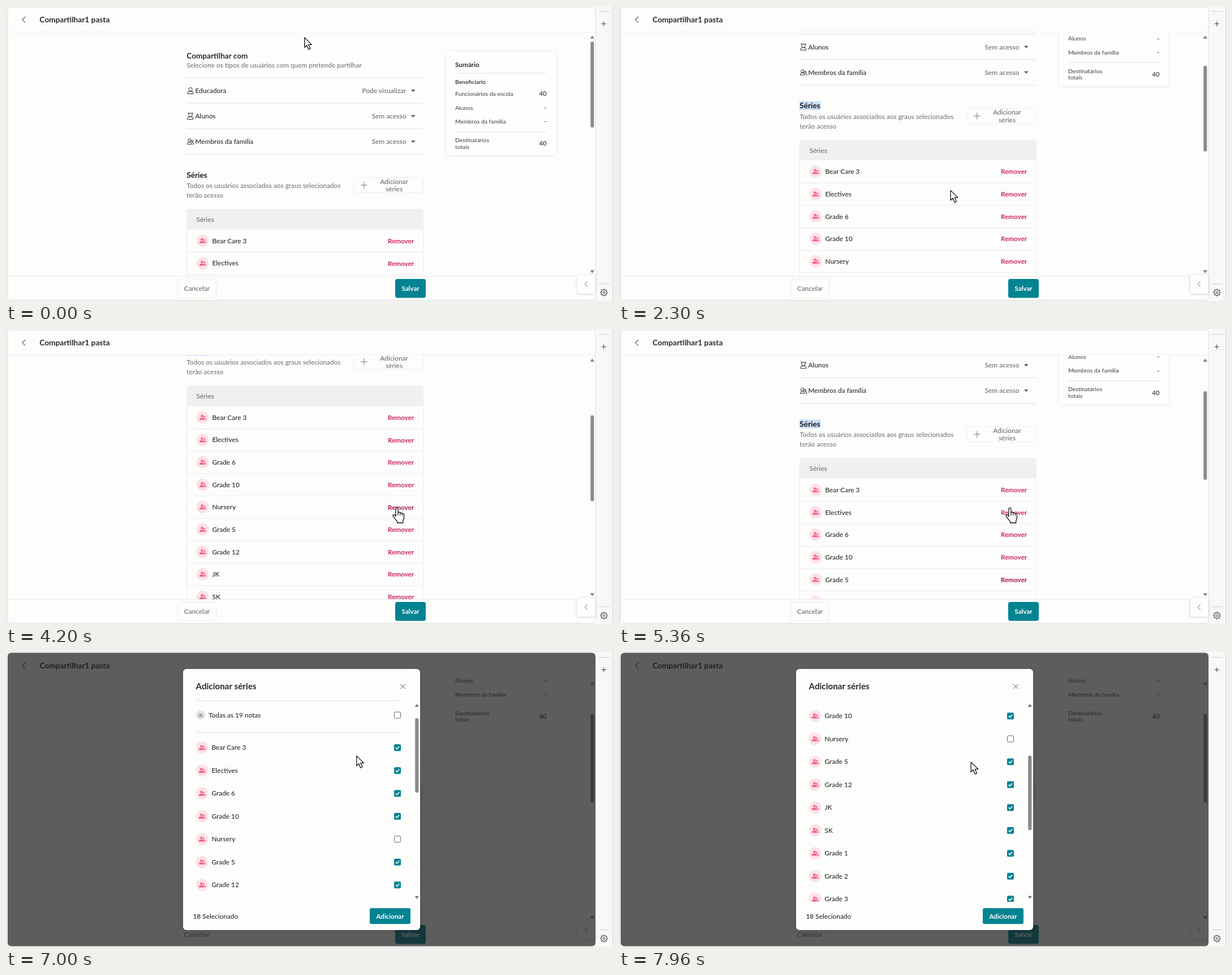
These frames come from a looping animation (1073 px wide and 522 px high, 8 s). An HTML page:

```html
<!DOCTYPE html>
<html lang="pt">
<head>
<meta charset="utf-8">
<title>Compartilhar pasta</title>
<style>
html, body { margin: 0; width: 100%; height: 100%; overflow: hidden; background: #f8f8f8; }
svg { display: block; width: 1073px; height: 522px; font-family: Lato, "Open Sans", sans-serif; }
text { white-space: pre; }
</style>
</head>
<body>
<svg id="stage" viewBox="0 0 1073 522" xmlns="http://www.w3.org/2000/svg"></svg>
<script>
const LOOP = 8000, ROW = 39.65, MROW = 40.5, TICK = 129.5, BODY = 11.85;
const INK = '#2b2b2b', GREY = '#6c6c6c', TEAL = '#038391', RED = '#cf2457', DARK_RED = '#a31540';
const NAMES = ['Bear Care 3', 'Electives', 'Grade 6', 'Grade 10', 'Nursery', 'Grade 5', 'Grade 12',
  'JK', 'SK', 'Grade 1', 'Grade 2', 'Grade 3', 'Grade 4', 'Grade 7', 'Grade 8'];
const REMOVED = 4;

// cy is the middle of the capital letters
const text = (x, cy, s, size = BODY, fill = INK, weight = 500, anchor = 'start', extra = '') =>
  `<text x="${x}" y="${cy + size * 0.355}" font-size="${size}" fill="${fill}" font-weight="${weight}" text-anchor="${anchor}" ${extra}>${s}</text>`;
const rect = (x, y, w, h, r, fill, stroke = 'none', extra = '') =>
  `<rect x="${x}" y="${y}" width="${w}" height="${h}" rx="${r}" fill="${fill}" stroke="${stroke}" ${extra}/>`;
const path = (d, stroke = INK, width = 1, fill = 'none', extra = '') =>
  `<path d="${d}" stroke="${stroke}" stroke-width="${width}" fill="${fill}" ${extra}/>`;
const hline = (x1, x2, y, color = '#e2e2e2') => path(`M${x1} ${y}H${x2}`, color);
const tri = (x, y, w, h, fill) => path(`M${x - w} ${y - h}H${x + w}L${x} ${y + h}Z`, 'none', 0, fill);
const group = (id, body, extra = '') => `<g id="${id}" ${extra}>${body}</g>`;

const people = (x, y, k, fill) => `<g transform="translate(${x} ${y}) scale(${k})" fill="${fill}">
  <circle cx="-1.2" cy="-2.6" r="2.3"/><path d="M-6 4.5v-1.2q0-2.8 4.8-2.8q4.8 0 4.8 2.8v1.2z"/>
  <circle cx="3.2" cy="-1.4" r="1.7"/><path d="M4.4 4.5v-1.4q0-1.4-.9-2.1q3.2 0 3.2 2.2v1.3z"/></g>`;
const badge = (x, y) => `<circle cx="${x}" cy="${y}" r="11" fill="#fde2e8"/>` + people(x, y, 0.95, '#f26385');

const person = (x, y) => path(`M${x - 5} ${y + 5.5}v-1.6q0-2.9 3-2.9h4q3 0 3 2.9v1.6z`) +
  `<circle cx="${x}" cy="${y - 2.3}" r="3.3" fill="none" stroke="${INK}"/>`;
const pupil = (x, y) => path(`M${x - 5} ${y + 5.5}v-1.6q0-2.6 2.8-2.6h4.4q2.8 0 2.8 2.6v1.6zM${x - 5} ${y - 5.3}h10M${x - 3} ${y - 5}v3.2a3 3 0 0 0 6 0v-3.2`);
const family = (x, y) => path(`M${x - 5.5} ${y + 4.5}v-1q0-2.8 3.8-2.8q3.8 0 3.8 2.8v1zM${x + 3.6} ${y + 4.5}h2.4v-1q0-2.3-3.2-2.5`) +
  `<circle cx="${x - 1.7}" cy="${y - 2.3}" r="2.6" fill="none" stroke="${INK}"/><circle cx="${x + 3.1}" cy="${y - 0.9}" r="1.6" fill="none" stroke="${INK}"/>`;

const access = (y, icon, name, level) => icon(326, y) + text(334.5, y, name) +
  text(707.5, y, level, 12, GREY, 500, 'end') + tri(719.8, y, 3.8, 2, '#555');

const listRow = (name, i) => {
  const y = 415.5 + ROW * i;
  return group('row' + i, badge(347.5, y) + text(364.5, y, name) +
    text(721, y + 0.3, 'Remover', 11.6, RED, 700, 'end', `id="rem${i}"`) + hline(320, 738, y + 20, '#ececec'));
};

const checkbox = (x, y, on) => on
  ? rect(x - 6, y - 6, 12, 12, 2, TEAL) + path(`M${x - 3.2} ${y}l2.3 2.4l4.2-4.6`, '#fff', 1.5)
  : rect(x - 5.5, y - 5.5, 11, 11, 2, '#fff', '#666');

const modalRow = (name, i) => {
  const y = 209.5 + MROW * i;
  return badge(346.5, y) + text(363.5, y, name) + checkbox(692, y, i !== REMOVED);
};

const summary = () => rect(777.5, 80, 195, 184.5, 6, '#fefefd', '#f0f0f0', 'filter="url(#soft)"') +
  text(794, 103.5, 'Sumário', 11.7, INK, 700) + hline(794, 955.5, 119) +
  text(794, 134, 'Beneficiario', 10.3, INK, 600) +
  [['Funcionários da escola', 155, '40'], ['Alunos', 180, '-'], ['Membros da família', 204.5, '-']]
    .map(([s, y, v]) => text(794, y, s, 10.4, '#3c3c3c', 400) + text(955.5, y, v, 11.2, INK, 500, 'end')).join('') +
  hline(794, 955.5, 222.5) + text(794, 237.5, 'Destinatários', 10.3, '#3c3c3c', 400) +
  text(794, 249.3, 'totais', 10.3, '#3c3c3c', 400) + text(955.5, 243.5, '40', 11.2, INK, 500, 'end');

const content = () =>
  text(319.3, 88, 'Compartilhar com', 13.6, INK, 700) +
  text(319.3, 104.5, 'Selecione os tipos de usuários com quem pretende partilhar', BODY, GREY, 400) +
  [126.5, 172, 217.2, 262.5].map(y => hline(319, 738, y)).join('') +
  access(150, person, 'Educadora', 'Pode visualizar') +
  access(195, pupil, 'Alunos', 'Sem acesso') +
  access(240, family, 'Membros da família', 'Sem acesso') +
  rect(319, 291, 0, 15.5, 0, '#cbdffb', 'none', 'id="sel"') +
  text(319.3, 298.7, 'Séries', 13.6, '#1c1c1c', 700) +
  text(319.3, 318, 'Todos os usuários associados aos graus selecionados', BODY, GREY, 400) +
  text(319.3, 335, 'terão acesso', BODY, GREY, 400) +
  rect(614.5, 303.5, 123, 27, 4, '#fdfdfc', '#efefef') + path('M627 317H638.5M632.8 311.2V322.8', '#777') +
  text(686, 310.5, 'Adicionar', BODY, GREY, 500, 'middle') + text(686, 323.8, 'séries', BODY, GREY, 500, 'middle') +
  path('M319.5 1100V364.5q0-5 5-5H732.5q5 0 5 5V1100', '#ececec') +
  path('M319.5 395.5V364.5q0-5 5-5H732.5q5 0 5 5V395.5Z', 'none', 0, '#f1f0f1') +
  text(336.5, 378, 'Séries', BODY, GREY, 500) +
  NAMES.map(listRow).join('') + summary();

const gear = (x, y) => {
  let d = '';
  for (let i = 0; i < 32; i++) {
    const a = i / 32 * Math.PI * 2, r = i % 4 < 2 ? 6 : 4.6;
    d += (i ? 'L' : 'M') + (x + r * Math.cos(a)).toFixed(2) + ' ' + (y + r * Math.sin(a)).toFixed(2);
  }
  return path(d + 'Z', '#444', 1.1, 'none', 'stroke-linejoin="round"') + `<circle cx="${x}" cy="${y}" r="1.9" fill="none" stroke="#444"/>`;
};

const sidebar = () => hline(1047.5, 1067, 9.5, '#cfcfcf') + path('M1052.5 31.5H1061M1056.7 27.3V35.7', '#444') +
  hline(1047.5, 1067, 491.5, '#cfcfcf') + gear(1057, 507) + path('M1072.5 0V522', '#d4d4d4') + path('M.5 0V522', '#d4d4d4');

const page = () => rect(3, 1.5, 1039, 519, 6, '#fdfdfc', '#dedede') +
  path('M34.3 19L28.8 24.3L34.3 29.6', '#555', 1.1) + text(59.3, 24.5, 'Compartilhar1 pasta', 13.7, INK, 700) +
  hline(4, 1041, 46, '#ececec') +
  `<g clip-path="url(#view)">${group('content', content())}</g>` +
  tri(1036.3, 55, 3.8, -2.7, '#858585') + tri(1036.3, 470.3, 3.8, 2.7, '#858585') +
  rect(1033.3, 63, 6, 152, 3, '#8a8a8a', 'none', 'id="thumb"') +
  hline(4, 1041, 478.5, '#e9e9e9') +
  rect(303.5, 483, 68, 33, 4, '#fdfdfc', '#ececec') + text(337.5, 499.7, 'Cancelar', BODY, GREY, 500, 'middle') +
  rect(688, 483, 54, 33.5, 4, TEAL) + text(715, 499.7, 'Salvar', 11.6, '#fff', 700, 'middle') +
  path('M1041.5 476.5H1014q-4 0-4 4V504.5q0 4 4 4H1041.5Z', 'none', 0, '#fefefe', 'filter="url(#shade)"') +
  path('M1027.8 487.7L1023 492.4L1027.8 497.1', '#666');

const modal = () => rect(3, 1.5, 1039, 519, 6, '#1a1a1a', 'none', 'opacity=".7"') +
  rect(313, 30, 419, 462, 6, '#fdfdfc', 'none', 'filter="url(#shade)"') +
  text(335.5, 61, 'Adicionar séries', 15.2, INK, 700) + path('M697 56.7l8.6 8.6M705.6 56.7l-8.6 8.6', '#555') +
  `<g clip-path="url(#mview)">` + group('mlist',
    rect(336, 94.5, 361, 32, 4, 'none', '#dcdcdc') +
    '<circle cx="344" cy="152" r="8" fill="#e4e4e4"/>' + people(344, 152, 0.66, '#8f8f8f') +
    text(358, 152, 'Todas as 19 notas') + checkbox(692, 152, false) + hline(335.5, 700, 183, '#e0e0e0') +
    NAMES.map(modalRow).join('')) + '</g>' +
  tri(726.3, 94.3, 3.6, -2.6, '#777') + tri(726.3, 434.3, 3.6, 2.6, '#777') +
  rect(723.2, 102, 6.2, 132, 3, '#8a8a8a', 'none', 'id="mthumb"') +
  text(330.5, 467.5, '18 Selecionado') +
  rect(643, 453.3, 72, 28, 3, TEAL) + text(679, 467.5, 'Adicionar', 11.5, '#fff', 700, 'middle');

const cursors = () =>
  group('arrow', path('M.7 .9V18.2L4.7 14.6L7.8 22L11 20.6L7.9 13.4H13.4Z', '#111', 1.3, '#fff', 'stroke-linejoin="round"')) +
  group('beam', path('M-3 -8.5q3 0 3 2V6.5q0 2 -3 2M3 -8.5q-3 0 -3 2M0 6.5q0 2 3 2', '#111', 1.2)) +
  group('hand', path('M-2 15.5V2.3a2 2 0 0 1 4 0V10q0-1.8 1.9-1.8t1.9 1.8v.8q0-1.6 1.8-1.6t1.8 1.6v1q0-1.4 1.5-1.4t1.6 1.6V18q0 2.6-1.7 5V27H.6V24.6Q-2.8 21-6.6 15.4q-1-1.8.4-2.6t2.6.5Z',
    '#111', 1.3, '#fff', 'stroke-linejoin="round"') + path('M2 10v4M5.8 11v3M9.4 12v2.5', '#111', 1.1));

const $ = id => document.getElementById(id);
$('stage').innerHTML = `<defs>
  <clipPath id="view"><rect x="4" y="46.5" width="1028" height="431.5"/></clipPath>
  <clipPath id="mview"><rect x="314" y="85" width="417" height="357"/></clipPath>
  <filter id="soft"><feDropShadow dx="0" dy="1" stdDeviation="1.5" flood-opacity=".07"/></filter>
  <filter id="shade"><feDropShadow dx="0" dy="1" stdDeviation="3" flood-opacity=".17"/></filter>
  </defs>` + rect(0, 0, 1073, 522, 0, '#f8f8f8') + sidebar() + page() +
  rect(376.5, 196, 30, 93, 4, '#f8f8f9', 'none', 'id="popup"') + group('modal', modal()) + cursors();

const el = {};
for (const id of ['content', 'sel', 'thumb', 'popup', 'modal', 'mlist', 'mthumb', 'arrow', 'beam', 'hand']) el[id] = $(id);
const rows = NAMES.map((_, i) => $('row' + i)), removes = NAMES.map((_, i) => $('rem' + i));

const MOVES = [[200, 527, 55], [820, 323, 299], [1200, 323, 299], [1480, 361, 300], [1660, 367, 300],
  [2000, 574, 325], [2060, 574, 325], [2300, 585.5, 325.5], [2660, 617, 326], [2930, 617, 326], [3600, 448, 346],
  [3630, 448, 346], [4180, 691, 316], [5360, 691, 316], [5700, 697, 181], [6430, 697, 181],
  [6530, 620, 184], [6700, 620, 184], [6760, 619, 183], [7000, 619, 183], [7560, 621.5, 194]];

const smooth = u => { u = Math.min(1, Math.max(0, u)); return u * u * (3 - 2 * u); };
const ramp = (t, start, length = 205) => smooth((t - start) / length);
const show = (node, on) => node.setAttribute('display', on ? 'inline' : 'none');
const within = (t, a, b) => t >= a && t < b;

function pointer(t) {
  const i = MOVES.findIndex(m => m[0] > t);
  if (i === 0) return MOVES[0].slice(1);
  if (i < 0) return MOVES[MOVES.length - 1].slice(1);
  const [t0, x0, y0] = MOVES[i - 1], [t1, x1, y1] = MOVES[i];
  const k = smooth((t - t0) / (t1 - t0));
  return [x0 + (x1 - x0) * k, y0 + (y1 - y0) * k];
}

function draw(t) {
  const [x, y] = pointer(t), removed = t >= 4500;
  const scroll = TICK * (ramp(t, 2125) + ramp(t, 2800, 130) - ramp(t, 5168));
  el.content.setAttribute('transform', `translate(0 ${-scroll})`);
  el.thumb.setAttribute('y', 63 + scroll * (removed ? 0.359 : 0.3465));
  el.thumb.setAttribute('height', removed ? 157 : 152);

  el.sel.setAttribute('width', t < 1200 ? 0 : Math.min(37.5, Math.max(0, (x - 323) * 1.05)));
  show(el.popup, within(t, 1600, 1960));
  el.popup.setAttribute('opacity', Math.min(0.96, ramp(t, 1590, 70), 1 - ramp(t, 1860, 100)));

  const hovered = within(t, 4110, 5430) ? REMOVED + removed : -1;
  rows.forEach((row, i) => {
    show(row, !(removed && i === REMOVED));
    row.setAttribute('transform', `translate(0 ${removed && i > REMOVED ? -ROW : 0})`);
    removes[i].setAttribute('fill', i === hovered ? DARK_RED : RED);
  });

  show(el.modal, t >= 6060);
  const listScroll = 130 * (ramp(t, 6925) + ramp(t, 7834));
  el.mlist.setAttribute('transform', `translate(0 ${-listScroll})`);
  el.mthumb.setAttribute('y', 102 + listScroll * 0.373);

  const kind = within(t, 790, 1480) ? 'beam'
    : within(t, 4110, 5430) || within(t, 5620, 6060) ? 'hand' : 'arrow';
  for (const name of ['arrow', 'beam', 'hand']) {
    show(el[name], name === kind);
    el[name].setAttribute('transform', `translate(${x} ${y})`);
  }
}

const begin = performance.now();
function tick() {
  draw((performance.now() - begin) % LOOP);
  requestAnimationFrame(tick);
}
draw(0);
requestAnimationFrame(tick);
</script>
</body>
</html>
```
